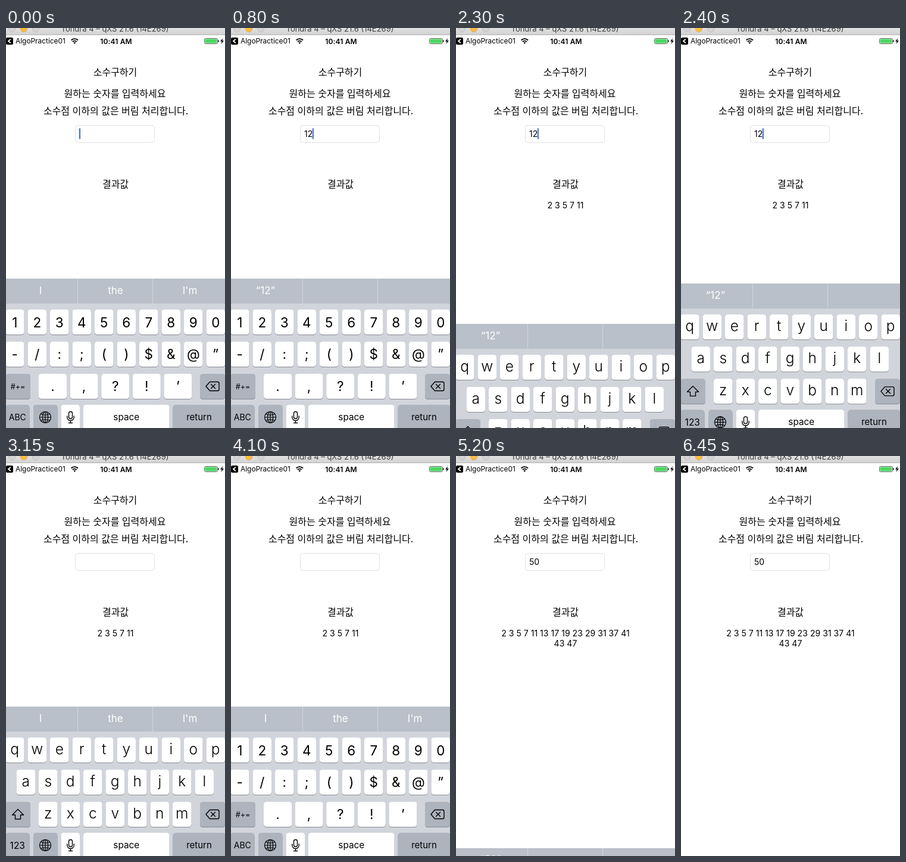
Write an HTML page that moves like this. It is 368 by 672 pixels and loops after 6.5 s.

```html
<!DOCTYPE html>
<html lang="ko">
<head>
<meta charset="utf-8">
<style>
html, body { margin: 0; width: 100%; height: 100%; overflow: hidden; background: #fff; }
svg { display: block; width: 368px; height: 672px; font-family: Inter, "Noto Sans", sans-serif; fill: #000; }
.ko { font: 16px "Noto Sans CJK KR", "Noto Sans CJK", sans-serif; }
.mid { text-anchor: middle; }
.small { font-size: 14.1px; }
.hint { font-size: 17px; fill: #fff; text-anchor: middle; }
.light { font-weight: 300; }
.key { fill: #fff; }
.dark { fill: #adb4be; }
.shade { fill: #888b91; }
.down { fill: #fff; }
.icon { fill: none; stroke: #000; stroke-width: 1.4; stroke-linejoin: round; stroke-linecap: round; }
</style>
</head>
<body>
<svg viewBox="0 0 368 672">
  <defs>
    <linearGradient id="bar" x2="0" y2="1">
      <stop stop-color="#e2e1e2"/><stop offset="1" stop-color="#d3d2d3"/>
    </linearGradient>
  </defs>

  <rect width="368" height="11" fill="url(#bar)"/>
  <rect y="11" width="368" height="1" fill="#b4b3b4"/>
  <g stroke-width=".8">
    <circle cx="10" cy="1" r="5.7" fill="#d5d3d5" stroke="#bab8ba"/>
    <circle cx="30" cy="1" r="5.7" fill="#fdbc40" stroke="#dfa03a"/>
    <circle cx="50" cy="1" r="5.7" fill="#d5d3d5" stroke="#bab8ba"/>
  </g>
  <text class="mid" x="183" y="6" font-size="13" fill="#3c3c3c">Tondra 4 – qXS 21.6 (14E269)</text>

  <rect y="16" width="12" height="12" rx="2.5"/>
  <path d="M7.8 18.8L4 22l3.800 3.200" fill="none" stroke="#fff" stroke-width="1.8"/>
  <text x="16" y="26" font-size="11.9">AlgoPractice01</text>
  <g fill="none" stroke="#000" stroke-width="1.9">
    <path d="M109.600 20.500a8 8 0 0 1 11.400 0M111.900 23a4.800 4.800 0 0 1 6.800 0"/>
  </g>
  <path d="M113.400 24.700a2.800 2.800 0 0 1 3.800 0l-1.900 2z"/>
  <text class="mid" x="185" y="26.500" font-size="12" font-weight="600" letter-spacing=".15">10:41 AM</text>
  <rect x="333.500" y="17.500" width="22" height="9" rx="2" fill="#fff" stroke="#555" stroke-width=".9"/>
  <rect x="334.500" y="18.500" width="20" height="7" rx="1" fill="#4cd964"/>
  <rect x="356.300" y="20.200" width="1.400" height="3.600" rx=".7"/>
  <path d="M364.300 17l-4.300 5.600h2.700l-1.200 4.400 4.500-5.800h-2.800z"/>

  <g class="ko mid">
    <text x="183.500" y="80">소수구하기</text>
    <text x="183" y="116">원하는 숫자를 입력하세요</text>
    <text x="184.500" y="145">소수점 이하의 값은 버림 처리합니다.</text>
    <text x="184" y="268">결과값</text>
  </g>
  <rect x="116.500" y="163.500" width="133" height="29" rx="5" fill="#fff" stroke="#e0e0e0"/>
  <text id="field" class="small" x="123" y="183"></text>
  <rect id="caret" y="168.500" width="2" height="18" fill="#4368c6"/>
  <g class="small mid">
    <text id="line1" x="184" y="303"></text>
    <text id="line2" x="184" y="320"></text>
  </g>
  <g id="board"></g>
</svg>

<script>
const LOOP = 6500, STEP = 50, TRAVEL = 258;
const $ = id => document.getElementById(id);

const label = (x, y, size, s) =>
  `<text class="mid" x="${x}" y="${y}" font-size="${size}">${s.replace('&', '&amp;')}</text>`;

function key(x, y, w, text = '', size = 22.5, base = 30, dark = false, id = '') {
  const box = `x="${x}" width="${w}" height="42" rx="4.5"`;
  return `<rect class="shade" ${box} y="${y + 1}"/>` +
    `<rect class="${dark ? 'dark' : 'key'}" ${box} y="${y}" ${id && `id="${id}"`}/>` +
    label(x + w / 2, y + base, size, text);
}

const row = (chars, x, y, w, pitch, size, base) =>
  [...chars].map((c, i) => key(x + i * pitch, y, w, c, size, base)).join('');

const letters = '<g class="light">' +
  row('qwertyuiop', -1, 473, 31.5, 37.5, 24.5, 28) +
  row('asdfghjkl', 17.5, 527, 31.5, 37.5, 24.5, 28) +
  row('zxcvbnm', 55, 581, 31.5, 37.5, 24.5, 28) + '</g>' +
  key(-1, 581, 42, '', 13, 26, true) +
  '<path class="icon" d="M20 593.500l9.500 9.500h-5v7h-9v-7h-5z"/>' +
  key(-1, 633, 40.5, '123', 15.5, 27, true);

const digits =
  row('1234567890', -1, 473, 31.5, 37.5, 22.5, 29.5) +
  row('-/:;()$&@”', -1, 527, 31.5, 37.5, 22.5, 29) +
  row('.,?!’', 55, 581, 47, 52.6, 22.5, 29) +
  key(-1, 581, 42, '#+=', 12.5, 26, true) +
  key(-1, 633, 40.5, 'ABC', 14, 26, true);

const shared =
  key(326, 581, 42, '', 15, 26, true, 'del') +
  `<path class="icon" d="M342.500 594.500h13a2.500 2.500 0 0 1 2.500 2.500v10a2.500 2.500 0 0 1-2.500 2.500h-13l-6.500-7.500z
    M344.500 598.500l7 7m0-7l-7 7"/>` +
  key(46, 633, 40.5, '', 15, 26, true) +
  `<g class="icon" style="stroke-width:1.200"><circle cx="66" cy="654" r="9.500"/><ellipse cx="66" cy="654" rx="4.600" ry="9.500"/>
    <path d="M66 644.500v19M56.500 654h19M58.500 648.500q7.500 3.500 15 0M58.500 659.500q7.500-3.500 15 0"/></g>` +
  key(92.5, 633, 31.5) +
  `<rect class="icon" x="105.500" y="644.500" width="6" height="12" rx="3"/>
    <path class="icon" d="M102.800 652v2a5.700 5.700 0 0 0 11.400 0v-2M108.500 660v3.500m-3 0h6"/>` +
  key(130, 633, 144.5, 'space', 15.3, 26) +
  key(280.5, 633, 88, 'return', 15, 26, true, 'ret');

$('board').innerHTML =
  `<rect y="421" width="368" height="270" fill="#d1d5db"/>
  <rect y="421" width="368" height="42" fill="#b9c0c9"/>
  <path d="M120.500 421v42M246.500 421v42" stroke="#d0d5da"/>
  <g class="hint"><text id="h0" x="58" y="446.500"></text><text id="h1" x="184" y="446.500"></text><text id="h2" x="309" y="446.500"></text></g>
  <g id="abc">${letters}</g><g id="num">${digits}</g>${shared}<g id="pop"></g>`;

// Enlarged key shown above a pressed digit
function callout(d) {
  const x = -1 + 37.5 * ((+d + 9) % 10), r = x + 31.5;
  const l = Math.max(-1, Math.min(x - 12, 312.5)), e = l + 55.5;
  return `<path fill="#fff" stroke="#b4b8be" stroke-width=".7" d="M${l + 8} 417H${e - 8}q8 0 8 8V452
    C${e} 463 ${r} 462 ${r} 474V510q0 5-5 5H${x + 5}q-5 0-5-5V474C${x} 462 ${l} 463 ${l} 452V425q0-8 8-8z"/>` +
    label((l + e) / 2, 454, 34, d);
}

// Start time, then field text
const edits = [[0, ''], [300, '1'], [600, '12'], [2600, '1'], [2750, ''], [4450, '5'], [4750, '50']];
const taps = [[200, '1'], [500, '2'], [4350, '5'], [4650, '0'],
  [2600, 'del'], [2750, 'del'], [1150, 'ret'], [5000, 'ret']];

const spring = ms => ms <= 0 ? 0 : 1 - (1 + ms * .028) * Math.exp(-ms * .028);

function boardShift(t) {
  if (t < 2200) return TRAVEL * spring(t - 1200);
  if (t < 5050) return TRAVEL * (1 - spring(t - 2212));
  return TRAVEL * spring(t - 5050);
}

function blink(ms) {
  const p = ms % 900;
  if (p <= 300) return 1;
  if (p < 400) return (400 - p) / 100;
  return Math.max(0, Math.min(1, (p - 700) / 150));
}

function primes(n) {
  const out = [];
  for (let i = 2; i <= n; i++) if (out.every(p => i % p)) out.push(i);
  return out;
}

function draw(t) {
  const [since, text] = edits.filter(e => e[0] <= t).pop();
  const tap = (taps.find(([at]) => t >= at && t < at + 100) || [''])[1] || '';
  const focused = t < 1250 || t >= 2200 && t < 5100;
  const found = t < 1250 ? [] : primes(t < 5100 ? 12 : 50);

  $('field').textContent = text;
  $('line1').textContent = found.slice(0, 13).join(' ');
  $('line2').textContent = found.slice(13).join(' ');

  const active = t >= 2200 ? Math.max(since, 2200) : since;
  $('caret').setAttribute('x', 123 + (text && $('field').getComputedTextLength() - .5));
  $('caret').style.opacity = focused ? blink(t - active) : 0;

  const hints = text ? [`“${text}”`, '', ''] : ['I', 'the', "I'm"];
  hints.forEach((s, i) => $('h' + i).textContent = s);

  const alpha = t >= 2200 && t < 3400;
  $('abc').style.display = alpha ? '' : 'none';
  $('num').style.display = alpha ? 'none' : '';
  for (const id of ['del', 'ret']) $(id).classList.toggle('down', tap === id);
  $('pop').innerHTML = /\d/.test(tap) ? callout(tap) : '';

  const shift = boardShift(t);
  $('board').style.display = shift > 251 ? 'none' : '';
  $('board').setAttribute('transform', `translate(0 ${shift.toFixed(2)})`);
}

const start = performance.now();
function tick() {
  const t = (performance.now() - start) % LOOP;
  draw(Math.floor(t / STEP) * STEP);
  requestAnimationFrame(tick);
}
tick();
</script>
</body>
</html>
```
